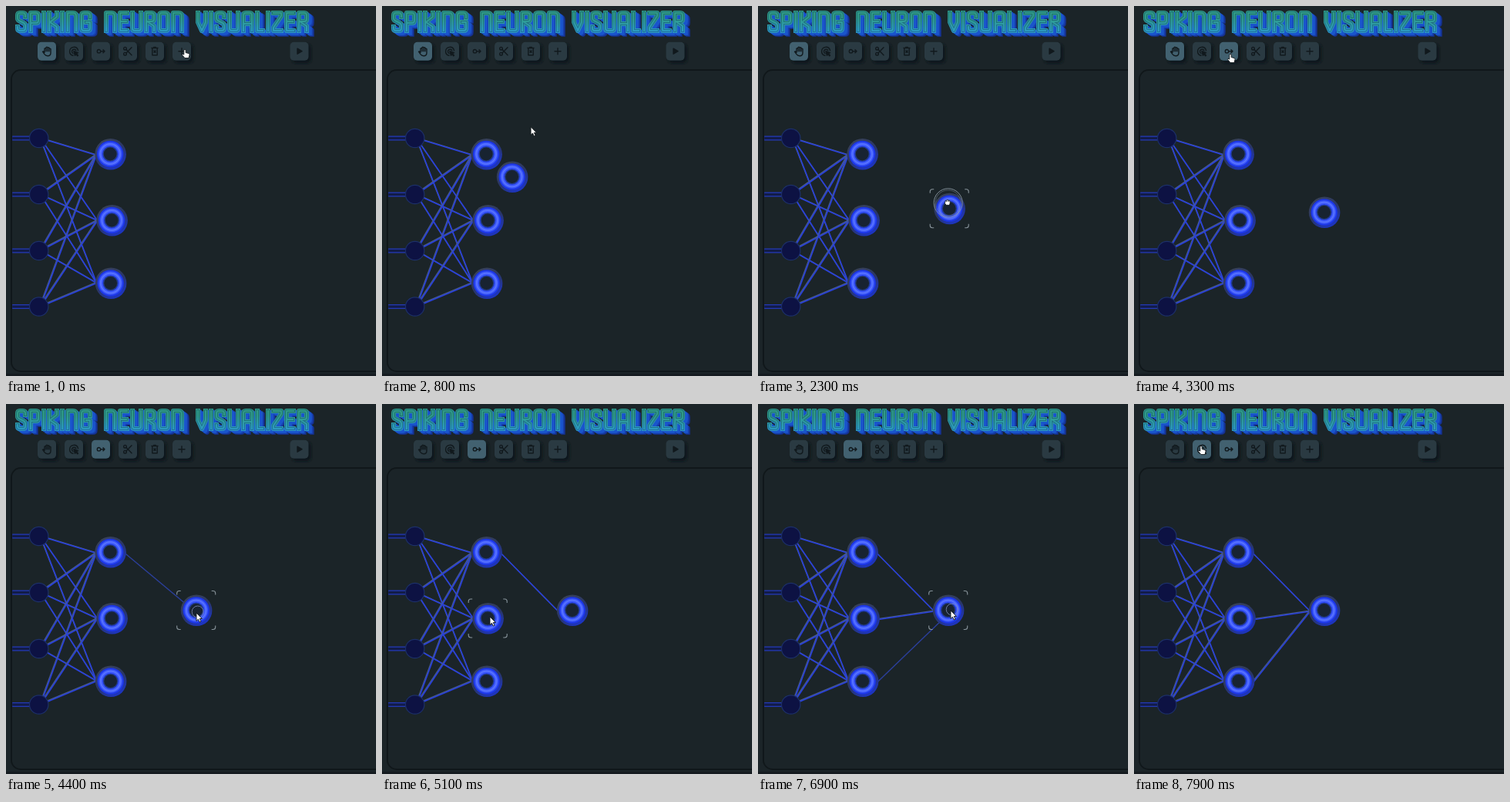
Recreate the animation shown at these times as an HTML page. Size 480x480 px, loop 8000 ms.

```html
<!DOCTYPE html>
<html lang="en">
<head>
<meta charset="utf-8">
<title>Spiking Neuron Visualizer</title>
<style>
html, body { margin: 0; width: 100%; height: 100%; overflow: hidden; background: #1b2428; }
svg { display: block; width: 100vw; height: 100vh; }
.line { fill: none; }
.button { fill: #2a3a42; }
.button.active { fill: #426170; }
.icon { fill: none; stroke: #11191d; stroke-width: 1.4; stroke-linecap: round; stroke-linejoin: round; }
.solid { fill: #11191d; }
.edge .back { stroke: #4c608a; stroke-width: 1.3; }
.edge .front { stroke: #2940dc; stroke-width: 1.6; }
#cursor path { fill: #fff; stroke: #11171a; stroke-width: .9; stroke-linejoin: round; }
</style>
</head>
<body>
<svg viewBox="0 0 480 480">
  <defs>
    <linearGradient id="face" gradientUnits="userSpaceOnUse" x1="0" y1="6" x2="0" y2="35">
      <stop offset="0" stop-color="#2f9c86"/>
      <stop offset=".5" stop-color="#2c9db8"/>
      <stop offset="1" stop-color="#2c8fe0"/>
    </linearGradient>
    <linearGradient id="fill" gradientUnits="userSpaceOnUse" x1="0" y1="6" x2="0" y2="35">
      <stop offset="0" stop-color="#1f6f74"/>
      <stop offset="1" stop-color="#1f72b8"/>
    </linearGradient>
    <linearGradient id="rim" x1=".2" y1="0" x2=".8" y2="1">
      <stop offset="0" stop-color="#3a4358"/>
      <stop offset=".5" stop-color="#2a3668"/>
      <stop offset="1" stop-color="#1a34d4"/>
    </linearGradient>
    <filter id="soft" x="-30%" y="-30%" width="170%" height="170%"><feGaussianBlur stdDeviation="1.5"/></filter>
    <g id="letters" stroke-linecap="square" stroke-linejoin="round"></g>
    <g id="neuron">
      <circle cx=".4" cy=".3" r="20.3" fill="url(#rim)"/>
      <circle r="17.3" fill="#1c36e6"/>
      <circle r="12.8" class="line" stroke="#3c58fa" stroke-width="5"/>
      <circle r="12.8" class="line" stroke="#5873ff" stroke-width="1.8"/>
      <circle r="9.8" fill="#233c90"/>
      <circle r="8.4" fill="#182331"/>
    </g>
  </defs>

  <rect width="480" height="480" fill="#1b2428"/>
  <rect y="477" width="480" height="3" fill="#151b20"/>
  <g id="title" class="line" role="img" aria-label="SPIKING NEURON VISUALIZER"></g>
  <g id="tools"></g>
  <rect x="7" y="83" width="500" height="391" rx="12" class="line" stroke="#10171a" stroke-width="1.8"/>
  <g transform="translate(.7 .5)">
    <g id="inputs"></g>
    <g id="edges"></g>
    <line id="wire" stroke="#2b3f9c" stroke-width="1.4"/>
    <g id="nodes"></g>
    <use id="added" href="#neuron"/>
    <path id="corners" class="line" stroke="#87939a" stroke-width="1.1"
      d="M-25-20V-22Q-25-25-22-25H-20M20-25H22Q25-25 25-22V-20M25 20V22Q25 25 22 25H20M-20 25H-22Q-25 25-25 22V20"/>
    <g id="ghost" class="line" stroke="#8b98a2" stroke-width=".9">
      <circle r="18.5"/><circle r="16.5" opacity=".5"/>
    </g>
    <circle id="snap" r="7.5" class="line" stroke="#8390b8" stroke-width=".8"/>
  </g>
  <g id="cursor">
    <path id="pointer" d="M-1.2 0Q0-1.2 1.2 0V3.5L5 4.5Q6.3 5 6 6.5L5 10.5H0L-3.5 6.5Q-3.5 5-2 5.5L-1.2 6.2Z"/>
    <path id="grab" d="M-3-1Q-3-3-1.5-2.5Q0-4 1-2.7Q3.5-3 3.3 0Q3.3 3 1.8 3.5H-1.5Q-3.8 2-3.6 .5ZM-1.3-2.3V-.8M.9-2.5V-.8"/>
    <path id="arrow" d="M0 0V10.5L2.4 8.2L4.2 12L6 11.2L4.3 7.5H7.4Z"/>
  </g>
</svg>
<script>
const $ = id => document.getElementById(id);
const show = (id, on) => $(id).setAttribute('visibility', on ? 'visible' : 'hidden');
const place = (id, [x, y]) => $(id).setAttribute('transform', `translate(${x} ${y})`);

// Lettering: stroke width plus a centre line on a 23 unit tall grid.
const glyphs = {
  S: [10, 'M10 5V3Q10 0 7 0H3Q0 0 0 3V7Q0 9 2 10L8 13Q10 14 10 16V20Q10 23 7 23H3Q0 23 0 20V18'],
  P: [10, 'M0 23V0H7Q10 0 10 3V10Q10 13 7 13H0'],
  I: [0, 'M0 0V23'],
  K: [10, 'M0 0V23M10 0V5L1 12L10 18V23'],
  N: [11, 'M0 23V0H7Q11 0 11 4V23'],
  G: [11, 'M11 6V3Q11 0 8 0H3Q0 0 0 3V20Q0 23 3 23H8Q11 23 11 20V12H6'],
  E: [9, 'M9 0H0V23H9M0 11H8'],
  U: [11, 'M0 0V20Q0 23 3 23H8Q11 23 11 20V0'],
  R: [10, 'M0 23V0H7Q10 0 10 3V8Q10 11 7 11H1L10 17V23'],
  O: [11, 'M3 0H8Q11 0 11 3V20Q11 23 8 23H3Q0 23 0 20V3Q0 0 3 0Z'],
  V: [10, 'M0 0V12L5 23L10 12V0'],
  A: [11, 'M0 23V3Q0 0 3 0H8Q11 0 11 3V23M0 14H11'],
  L: [7, 'M0 0V23H7'],
  Z: [10, 'M0 0H10V4L0 19V23H10']
};
let penX = 15;
for (const c of 'SPIKING NEURON VISUALIZER') {
  if (c === ' ') { penX += 14; continue; }
  const [width, d] = glyphs[c];
  $('letters').innerHTML += `<path d="${d}" transform="translate(${penX} 9)"/>`;
  penX += width + 7;
}
const layer = (x, y, color, width) =>
  `<use href="#letters" transform="translate(${x} ${y})" stroke="${color}" stroke-width="${width}"/>`;
$('title').innerHTML = [
  [7, 5, '#16308e', 5.5], [5.5, 4, '#1740b0', 5.5], [4, 3, '#1a55cc', 5.5], [2, 1.5, '#1a55cc', 5.5],
  [0, 0, 'url(#face)', 6], [0, 0, 'url(#fill)', 4.2], [0, 0, 'url(#face)', 2]
].map(args => layer(...args)).join('');

// Toolbar
const icons = [
  '<path d="M-3 1.5V-3.5Q-2-4.5-1 -3.5V0V-5Q0-6 1-5V0V-4.5Q2-5.5 3-4.5V0V-3Q4-4 5-3V2Q5 6 1 6Q-1.5 6-3 4L-5.5 .5Q-4.5-.5-3 1.5"/>',
  '<path d="M-1 5.5A5.5 5.5 0 1 1 5.5-1M-1 2.8A2.8 2.8 0 1 1 2.8-1"/><path class="solid" d="M0 0L5.5 2L3.2 3L5.5 5.3L4.8 6L2.5 3.7L1.5 5.5Z"/>',
  '<circle cx="-2.5" r="2.2"/><path d="M0 0H5M3-2L5 0L3 2"/>',
  '<circle cx="-3.5" cy="-3.5" r="1.8"/><circle cx="-3.5" cy="3.5" r="1.8"/><path d="M-2-2.3L5 5M-2 2.3L5-5"/>',
  '<path d="M-4-4.2H4M-1.3-5.3H1.3M-3.2-4V5H3.2V-4M-1-.7L1 1.5M1-.7L-1 1.5"/>',
  '<path d="M-4 0H4M0-4V4"/>',
  '<path class="solid" d="M-2.5-3.5L3.5 0L-2.5 3.5Z"/>'
];
const toolX = [53, 88, 123, 158, 193, 228, 380.5];
$('tools').innerHTML = icons.map((icon, i) => `<g transform="translate(${toolX[i]} 58.7)">
  <rect x="-9.5" y="-9.5" width="25" height="25" rx="5" fill="#10171b" filter="url(#soft)"/>
  <rect class="button" x="-12" y="-12" width="24" height="24" rx="5"/>
  <g class="icon">${icon}</g></g>`).join('');
const buttons = document.querySelectorAll('.button');

// Network
const inputs = [171, 244, 317, 389.5].map(y => [42, y]);
const hidden = [[134.5, 191.5], [136.5, 277.5], [135, 359]];
const leftEnds = [[116.5, 193], [118, 278], [117, 359]];
const rightEnds = [[153.5, 193], [156, 279], [154.5, 360]];
const target = [228, 268.5];

const edge = ([x1, y1], [x2, y2]) => {
  const at = `x1="${x1}" y1="${y1}" x2="${x2}" y2="${y2}"`;
  return `<g class="edge"><line class="back" ${at} transform="translate(-.9 -.9)"/><line class="front" ${at}/></g>`;
};
$('edges').innerHTML = inputs.flatMap(([x, y]) => leftEnds.map(b => edge([x + 2, y], b))).join('') +
  rightEnds.map(a => edge(a, target)).join('');
const newEdges = [...document.querySelectorAll('.edge')].slice(-3);

$('inputs').innerHTML = inputs.map(([, y]) =>
  `<path d="M7.5 ${y}H32" stroke="#2338b4" stroke-width="6"/><path d="M7.5 ${y}H32" stroke="#121c48" stroke-width="3.4"/>`).join('');
$('nodes').innerHTML = inputs.map(([x, y]) =>
  `<circle cx="${x}" cy="${y}" r="12.2" fill="#0d1243" stroke="#1d3068" stroke-width="1.2"/>`).join('') +
  hidden.map(([x, y]) => `<use href="#neuron" x="${x}" y="${y}"/>`).join('');

// Pointer path: time, x, y
const path = [
  [0, 232, 57], [400, 232, 57], [1100, 168, 221], [1300, 168, 221],
  [1900, 224, 165], [2150, 250, 274], [2450, 242, 236], [2700, 246, 267], [2850, 246, 267],
  [3250, 125, 63], [3450, 125, 63], [3800, 138, 190], [3950, 138, 190],
  [4350, 247, 271], [4600, 247, 271], [5000, 140, 276], [5150, 140, 276],
  [5650, 261, 264], [5850, 261, 264], [6200, 139, 358], [6450, 139, 358],
  [6850, 250, 268], [7250, 250, 268], [7800, 87, 55], [8000, 87, 55]
];
const wires = [[3950, 4500], [5150, 5700], [6450, 6950]];
const spawn = 500, grabStart = 1300, grabEnd = 2700, lag = 40, connectAt = 3400;

function pointerAt(t) {
  const i = Math.max(1, path.findIndex(p => p[0] >= t));
  const [t0, x0, y0] = path[i - 1], [t1, x1, y1] = path[i];
  const u = (t - t0) / (t1 - t0), k = u * u * (3 - 2 * u);
  return [x0 + (x1 - x0) * k, y0 + (y1 - y0) * k];
}

function draw(t) {
  const [x, y] = pointerAt(t);
  const grabbing = t >= grabStart && t < grabEnd;
  const connecting = t >= connectAt;
  const added = pointerAt(Math.min(Math.max(t - lag, grabStart), grabEnd));
  place('added', added);
  show('added', t >= spawn);

  const near = ([cx, cy]) => Math.hypot(cx - x, cy - y) < 20;
  const hovered = grabbing ? added : [...hidden, ...(t >= spawn ? [added] : [])].find(near);
  if (hovered) place('corners', hovered);
  show('corners', hovered);
  place('ghost', [x, y]);
  show('ghost', grabbing);

  const active = wires.findIndex(([a, b]) => t >= a && t < b);
  show('wire', active >= 0);
  show('snap', active >= 0 && near(added));
  place('snap', [x + 1, y - 2]);
  if (active >= 0) {
    const [x1, y1] = rightEnds[active];
    Object.entries({ x1, y1, x2: x, y2: y }).forEach(([k, v]) => $('wire').setAttribute(k, v));
  }
  newEdges.forEach((e, i) => e.setAttribute('visibility', t >= wires[i][1] ? 'visible' : 'hidden'));

  const over = i => Math.abs(x - toolX[i]) < 12 && Math.abs(y - 58.7) < 12;
  buttons.forEach((b, i) => b.classList.toggle('active',
    i === (connecting ? 2 : 0) || (over(i) && i < 5)));

  const overTool = toolX.some((_, i) => over(i));
  place('cursor', [x, y]);
  show('pointer', overTool);
  show('grab', grabbing);
  show('arrow', !overTool && !grabbing);
}

const start = performance.now();
function tick() {
  draw((performance.now() - start) % 8000);
  requestAnimationFrame(tick);
}
tick();
</script>
</body>
</html>
```
